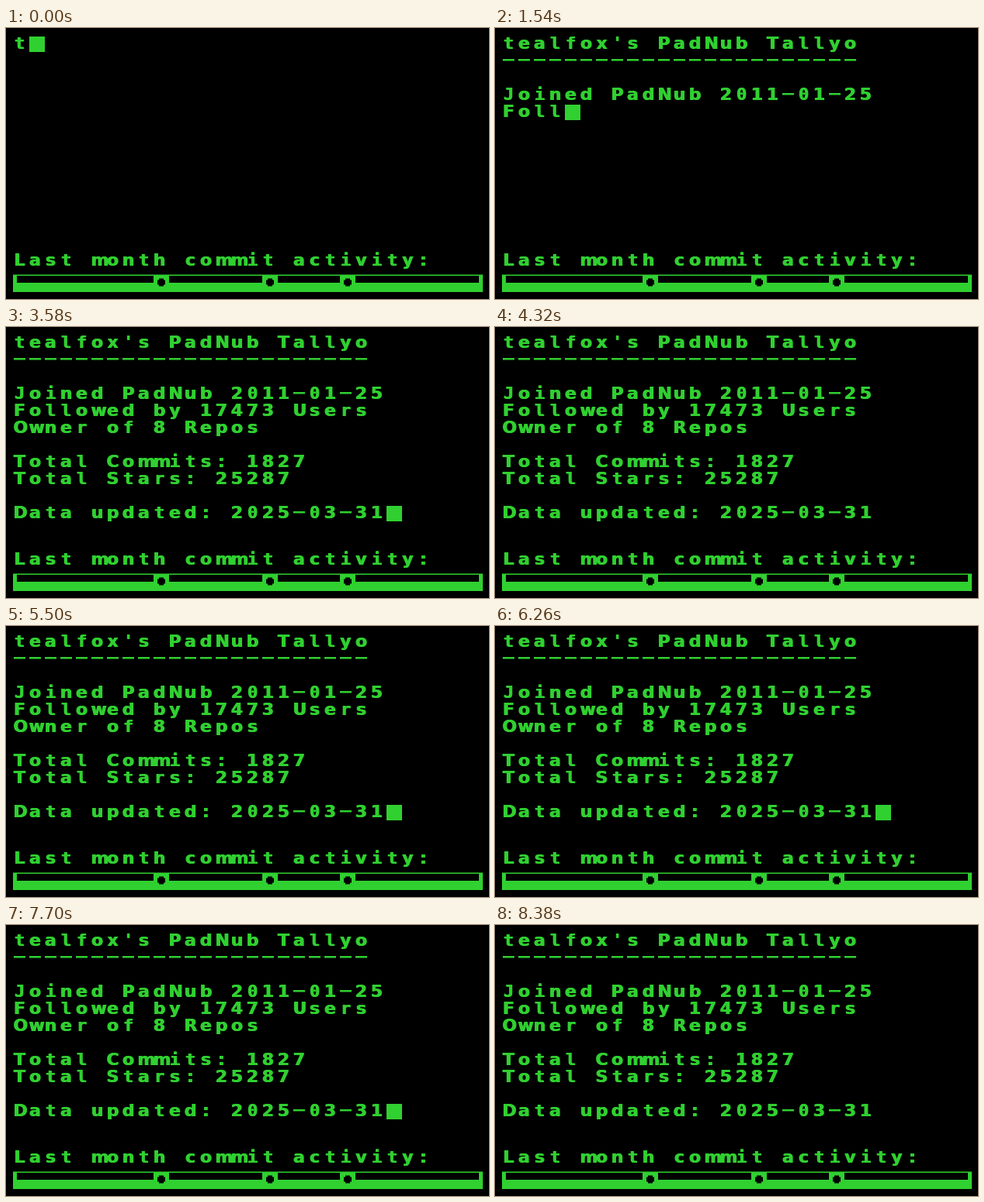
Animation of 622 by 350 pixels, one loop 8.4 s. Source, as an HTML page:

```html
<!DOCTYPE html>
<html lang="en">
<head>
<meta charset="utf-8">
<title>Terminal stats</title>
<style>
  :root { --ink: #30d030; }
  html, body { margin: 0; width: 100%; height: 100%; overflow: hidden; background: #000; }
  #stage { position: relative; width: 622px; height: 350px; overflow: hidden; background: #000; }
  .line {
    position: absolute; left: 10px; height: 20px; display: flex;
    font: bold 22px/20px "DejaVu Sans", Verdana, sans-serif;
    color: var(--ink); white-space: pre;
    text-shadow: -1px 0 var(--ink); /* heavier upright strokes */
  }
  .line span {
    flex: 0 0 20px; width: 20px; min-width: 0; height: 20px;
    box-sizing: border-box; padding-right: 4px; text-align: center;
  }
  .line .mono { font-family: "DejaVu Sans Mono", monospace; }
  .line .dash {
    color: transparent; text-shadow: none;
    background: linear-gradient(var(--ink), var(--ink)) 0 7.5px / 15px 2.5px no-repeat;
  }
  #cursor { position: absolute; width: 20px; height: 20px; background: var(--ink); }
  svg { position: absolute; left: 0; top: 0; }
</style>
</head>
<body>
<div id="stage">
  <svg id="chart" width="622" height="350" viewBox="0 0 622 350"></svg>
  <div id="cursor"></div>
</div>
<script>
const CELL = 20, PITCH = 22, LEFT = 10, TOP = 10;
const STEP = 20, BLINK = 400, LOOP = 8400;
const INK = 'var(--ink)', BLACK = '#000';

const text = [
  "tealfox's PadNub Tallyo",
  '-'.repeat(23),
  '',
  'Joined PadNub 2011-01-25',
  'Followed by 17473 Users',
  'Owner of 8 Repos',
  '',
  'Total Commits: 1827',
  'Total Stars: 25287',
  '',
  'Data updated: 2025-03-31'
].join('\n');

const stage = document.getElementById('stage');
const cursor = document.getElementById('cursor');
const chart = document.getElementById('chart');

function addLine(str, top) {
  const line = document.createElement('div');
  line.className = 'line';
  line.style.top = top + 'px';
  const cells = [...str].map(ch => {
    const cell = document.createElement('span');
    cell.textContent = ch;
    // narrow letters and the marked zero use the wider monospaced forms
    if (/[Jfilrt0]/.test(ch)) cell.className = 'mono';
    if (ch === '-') cell.className = 'dash';
    line.append(cell);
    return cell;
  });
  stage.append(line);
  return cells;
}

function rect(x, y, width, height, fill) {
  const node = document.createElementNS('http://www.w3.org/2000/svg', 'rect');
  const attrs = { x, y, width, height };
  for (const key in attrs) node.setAttribute(key, attrs[key]);
  node.style.fill = fill;
  chart.append(node);
}

function drawChart(days) {
  rect(9, 318.5, 605, 22.5, INK);
  rect(14, 320, 595, 9, BLACK);
  for (const day of days) {
    const x = LEFT + day * CELL;
    rect(x, 319, CELL, 12, INK);
    rect(x + 7, 323.5, 6, 10, BLACK);
    rect(x + 5, 325.5, 10, 6, BLACK);
  }
}

// one slot per character, line breaks included
const slots = text.split('\n').flatMap((str, row, all) => {
  const cells = addLine(str, TOP + row * PITCH);
  return row < all.length - 1 ? [...cells, null] : cells;
});
addLine('Last month commit activity:', 290);
drawChart([9, 16, 21]);

const typingEnd = text.length * STEP;
let shown = -1;

function draw(t) {
  const count = Math.min(text.length, Math.floor(t / STEP) + 1);
  if (count !== shown) {
    slots.forEach((cell, i) => {
      if (cell) cell.style.visibility = i < count ? 'visible' : 'hidden';
    });
    const typed = text.slice(0, count).split('\n');
    const row = typed.length - 1;
    cursor.style.left = LEFT + typed[row].length * CELL + 'px';
    cursor.style.top = TOP + row * PITCH + 1 + 'px';
    shown = count;
  }
  const lit = t < typingEnd || Math.floor((t - typingEnd) / BLINK) % 2 === 0;
  cursor.style.visibility = lit ? 'visible' : 'hidden';
}

const start = performance.now();
function tick() {
  draw((performance.now() - start) % LOOP);
  requestAnimationFrame(tick);
}
tick();
</script>
</body>
</html>
```
